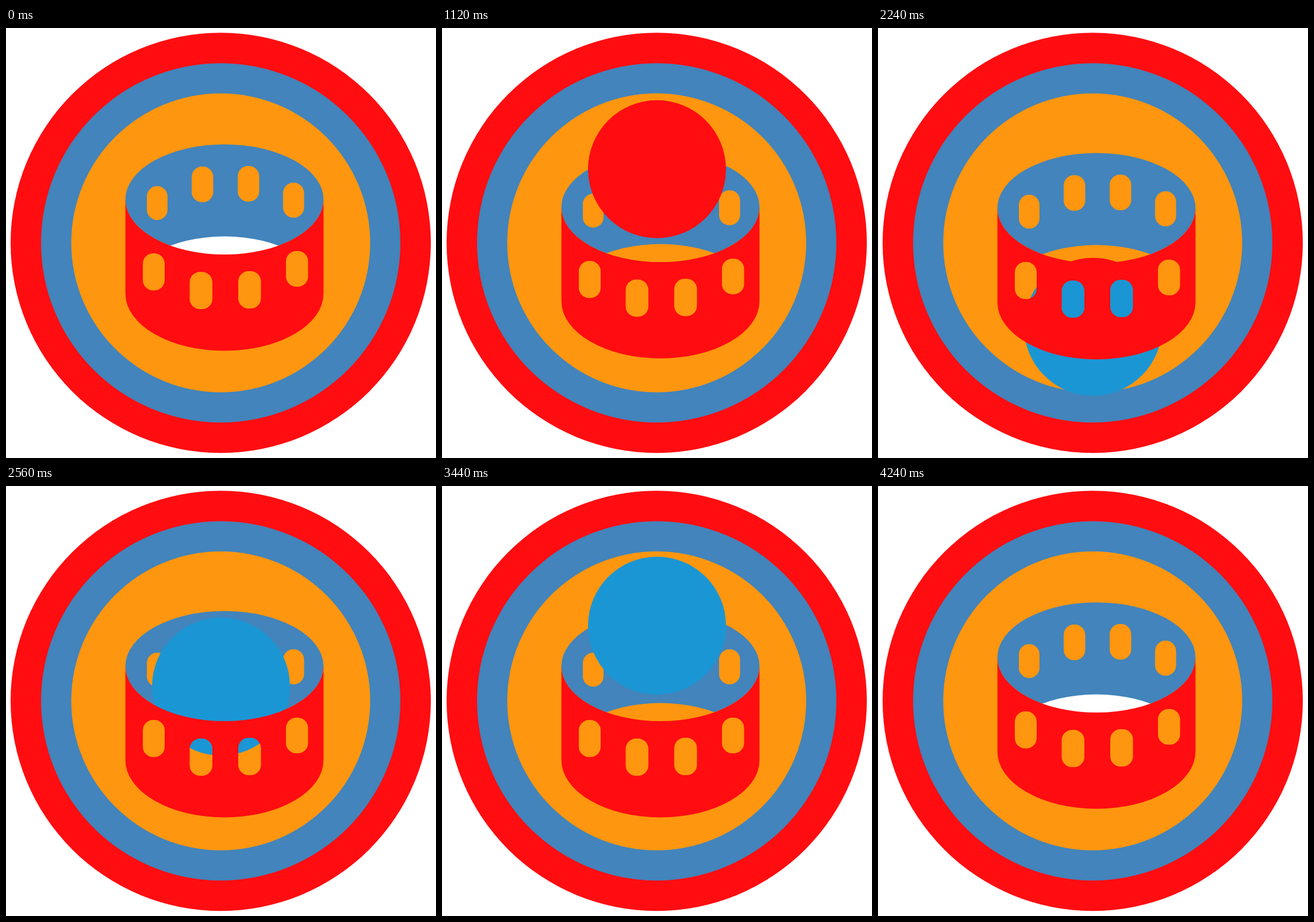
An HTML page with a canvas for the animation above (4560 ms loop, 748x748 px).

```html
<!DOCTYPE html>
<html lang="en">
<head>
<meta charset="utf-8">
<title>Bouncing ball</title>
<style>
  html, body { margin: 0; height: 100%; overflow: hidden; background: #fff; }
  canvas { display: block; }
</style>
</head>
<body>
<canvas width="748" height="748"></canvas>
<script>
const ctx = document.querySelector('canvas').getContext('2d');
const RED = '#ff0d11', BLUE = '#4284bb', ORANGE = '#ff960f', SKY = '#1b96d4';
const LOOP = 4560, STEP = 80, LEAD = 9, LAST = 44;

// Ring geometry, at rest
const CX = 380, RX = 172.3, RIM_Y = 298.3, RIM_RY = 95.8, BASE_Y = 462, BASE_RY = 99.5;
const BALL_X = 374, BALL_R = 120;

// Windows: x, y, width, height
const backWindows = [[245, 275, 36, 59], [323, 241, 37.5, 62], [403, 240, 37.5, 62], [482, 269, 36.5, 61]];
const frontWindows = [[238, 392, 38, 64.5], [319.5, 424.3, 39.5, 64.7], [404, 423, 39.5, 65], [487, 388, 38.5, 62]];

// Bezier easing with control points (a, 0) and (b, 1)
function ease(a, b, x) {
  let lo = 0, hi = 1;
  for (let i = 0; i < 30; i++) {
    const s = (lo + hi) / 2, r = 1 - s;
    if (3 * a * s * r * r + 3 * b * s * s * r + s ** 3 < x) lo = s; else hi = s;
  }
  return lo * lo * (3 - 2 * lo);
}

function tween(k, k0, k1, from, to, a, b) {
  const x = Math.min(1, Math.max(0, (k - k0) / (k1 - k0)));
  return from + (to - from) * ease(a, b, x);
}

function ballTop(k) {
  if (k < 10) return tween(k, 0, 10, 461, 81, 0.09, 0.01);
  if (k < 20) return tween(k, 10, 20, 81, 417, 0.95, 0.69);
  if (k < 30) return tween(k, 20, 30, 417, 101, 0.31, 0.05);
  return tween(k, 30, 40, 101, 417, 0.99, 0.91);
}

function ringDrop(k) {
  return k < 35 ? tween(k, 0, 10, 0, 15, 0.09, 0.01)
                : tween(k, 35, 44, 15, 0, 0, 0.56);
}

function ellipse(x, y, rx, ry, color) {
  ctx.beginPath();
  ctx.ellipse(x, y, rx, ry, 0, 0, 2 * Math.PI);
  ctx.fillStyle = color;
  ctx.fill();
}

const disc = (x, y, r, color) => ellipse(x, y, r, r, color);
const addWindows = list => list.forEach(w => ctx.roundRect(...w, 18));

function drawBack(holeColor) {
  ellipse(CX, RIM_Y, RX, RIM_RY, BLUE);
  ctx.beginPath();
  addWindows(backWindows);
  ctx.fillStyle = ORANGE;
  ctx.fill();
  ctx.save();
  clipAboveRim();
  ellipse(CX, BASE_Y, RX, BASE_RY, holeColor);
  ctx.restore();
}

// Everything above the near edge of the rim; the wall hides the 1px overlap
function clipAboveRim() {
  ctx.beginPath();
  ctx.ellipse(CX, RIM_Y + 1, RX, RIM_RY, 0, 0, Math.PI);
  ctx.lineTo(CX - RX, -50);
  ctx.lineTo(CX + RX, -50);
  ctx.clip();
}

function drawFront() {
  ctx.beginPath();
  ctx.ellipse(CX, RIM_Y, RX, RIM_RY, 0, 0, Math.PI);
  ctx.ellipse(CX, BASE_Y, RX, BASE_RY, 0, Math.PI, 0, true);
  ctx.closePath();
  addWindows(frontWindows);
  ctx.fillStyle = RED;
  ctx.fill('evenodd');
}

function draw(k) {
  const drop = ringDrop(k), ballY = ballTop(k) + BALL_R;
  const empty = k === 0 || k >= 40;

  ctx.fillStyle = '#fff';
  ctx.fillRect(0, 0, 748, 748);
  disc(373.5, 373.7, 365.5, RED);
  disc(373.5, 373.7, 312.5, BLUE);
  disc(373.5, 373.7, 260, ORANGE);

  // Part of the ball that passes out through the bottom
  if (Math.abs(k - 20) < 5) disc(BALL_X, ballY, BALL_R, SKY);

  ctx.save();
  ctx.translate(0, drop);
  drawBack(empty ? '#fff' : ORANGE);
  if (!empty) {
    ctx.save();
    clipAboveRim();
    disc(BALL_X, ballY - drop, BALL_R, k < 20 ? RED : SKY);
    ctx.restore();
  }
  drawFront();
  ctx.restore();
}

function tick() {
  const step = Math.floor(performance.now() % LOOP / STEP) - LEAD;
  draw(Math.min(LAST, Math.max(0, step)));
  requestAnimationFrame(tick);
}
tick();
</script>
</body>
</html>
```
